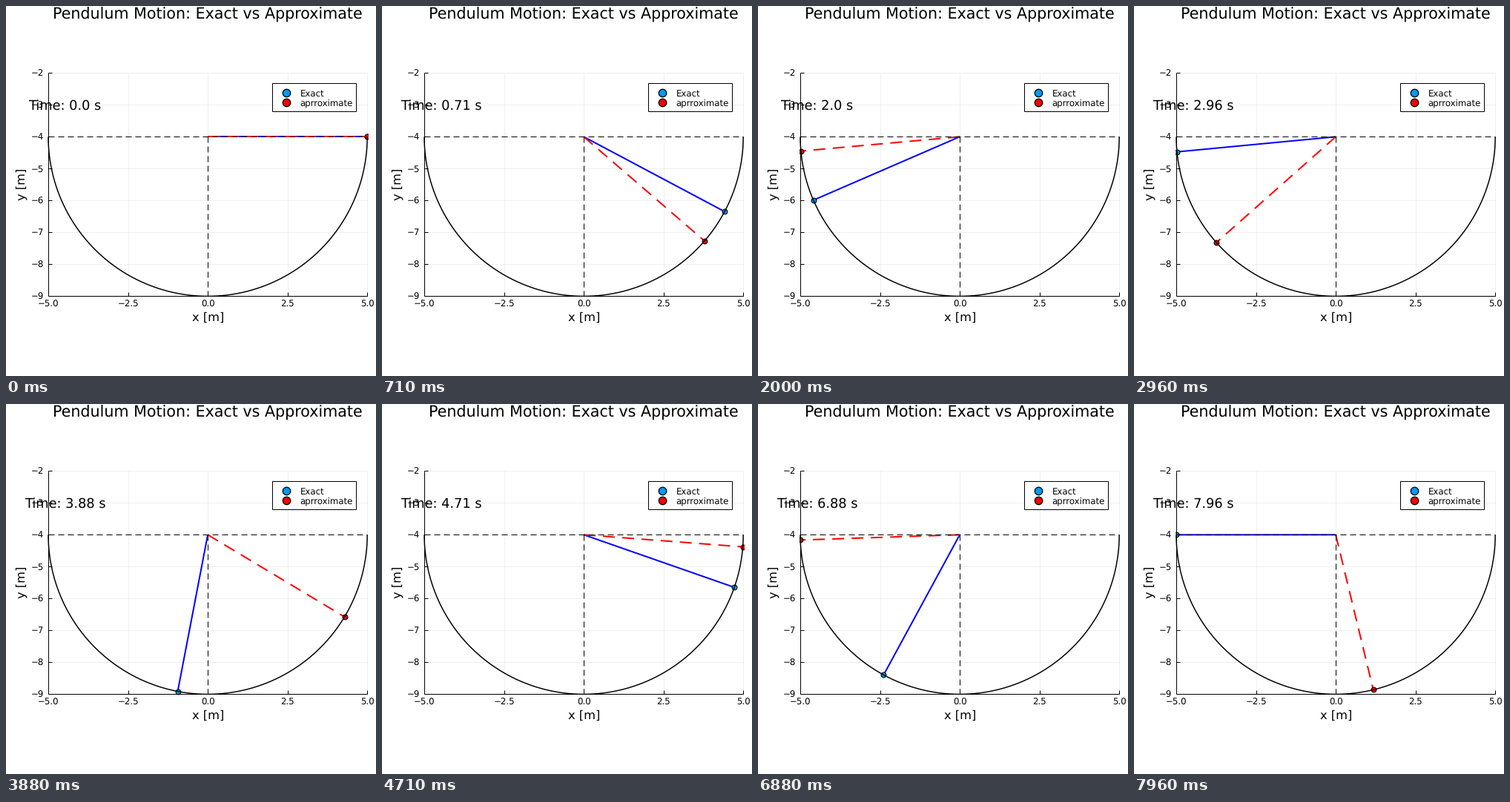
Animation of 499x499 px, one loop 8000 ms. Source, as a matplotlib script:

```python
import math

import matplotlib.pyplot as plt
from matplotlib.animation import FuncAnimation
from matplotlib.patches import Rectangle

SIZE, DPI = 499, 100
LOOP, STEP = 8000, 20          # ms
FPS = 24                       # simulation pictures per second
LENGTH, GRAVITY, PIVOT = 5.0, 9.81, -4.0
OMEGA2 = GRAVITY / LENGTH
START = math.pi / 2

PX = 72 / DPI                  # one pixel in points
FONT = 1.064
DASH = (0, (8, 5))
SKY = "#009AFA"

# plot area in pixels
X0, Y0, SCALE = 272.1, 176.35, 43.02
PAD = 1.0                      # room for strokes on the plot's edge

plt.rcParams["font.family"] = "DejaVu Sans"
plt.rcParams["text.hinting"] = "no_hinting"


def px(x):
    return X0 + SCALE * x


def py(y):
    return Y0 + SCALE * (PIVOT - y)


def swing(count, substeps=20):
    """Angles of the full nonlinear pendulum, by Runge-Kutta."""
    h = 1 / FPS / substeps
    a, v = START, 0.0
    angles = []

    def acc(angle):
        return -OMEGA2 * math.sin(angle)

    for _ in range(count):
        angles.append(a)
        for _ in range(substeps):
            a1, v1 = v, acc(a)
            a2, v2 = v + h / 2 * v1, acc(a + h / 2 * a1)
            a3, v3 = v + h / 2 * v2, acc(a + h / 2 * a2)
            a4, v4 = v + h * v3, acc(a + h * a3)
            a += h / 6 * (a1 + 2 * a2 + 2 * a3 + a4)
            v += h / 6 * (v1 + 2 * v2 + 2 * v3 + v4)
    return angles


def bob(angle):
    return LENGTH * math.sin(angle), PIVOT - LENGTH * math.cos(angle)


fig = plt.figure(figsize=(SIZE / DPI, SIZE / DPI), dpi=DPI, facecolor="white")

left, right, top, bottom = px(-5), px(5), py(-2), py(-9)
ax = fig.add_axes([(left - PAD) / SIZE, 1 - (bottom + PAD) / SIZE,
                   (right - left + 2 * PAD) / SIZE,
                   (bottom - top + 2 * PAD) / SIZE])
margin = PAD / SCALE
ax.set(xlim=(-5 - margin, 5 + margin), ylim=(-9 - margin, -2 + margin))
ax.axis("off")

page = fig.add_axes([0, 0, 1, 1])
page.set(xlim=(0, SIZE), ylim=(SIZE, 0))
page.axis("off")


def stroke(x, y, width=1.0, color="black", **kw):
    return page.plot(x, y, color=color, lw=width * PX,
                     solid_capstyle="butt", **kw)[0]


def label(x, y, text, points, ha="center", **kw):
    return page.text(x, y, text, fontsize=points * FONT, ha=ha,
                     va="baseline", color="black", **kw)


def series(width, color, z, **kw):
    return ax.plot([], [], color=color, lw=width * PX, zorder=z,
                   solid_capstyle="butt", dash_capstyle="butt", **kw)[0]


def ball(axes, x, y, size, edge, color, z):
    return axes.plot(x, y, "o", ms=size * PX, mfc=color, mec="black",
                     mew=edge * PX, zorder=z, snap=False)[0]


def number(value, digits):
    return f"{value:.{digits}f}".replace("-", "\u2212")


# grid, axes and ticks
for x in (-5, -2.5, 0, 2.5, 5):
    stroke([px(x)] * 2, [top, bottom], 0.6, alpha=0.1)
    stroke([px(x)] * 2, [bottom, bottom - 5])
    label(px(x), 406, number(x, 1), 8)
for y in range(-9, -1):
    stroke([left, right], [py(y)] * 2, 0.6, alpha=0.1)
    stroke([left, left + 5], [py(y)] * 2)
    label(51.5, py(y) + 4, number(y, 0), 8, ha="right")
stroke([left, right], [bottom, bottom])
stroke([left, left], [top, bottom])

label(272.3, 18, "Pendulum Motion: Exact vs Approximate", 14)
label(272.6, 425, "x [m]", 11)
label(26, 240.6, "y [m]", 11, rotation=90, rotation_mode="anchor")
clock = label(79.6, 140, "", 12)

# legend
page.add_patch(Rectangle((359.3, 104.3), 113, 38, fc="white", ec="black",
                         lw=PX, zorder=5))
for y, name, color in ((117.3, "Exact", SKY), (130.1, "aprroximate", "red")):
    ball(page, [378.5], [y], 10.4, 1.3, color, 6)
    label(396.4, y + 4.6, name, 8, ha="left", zorder=6)

# rods and bobs
exact_rod = series(2, "blue", 2)
exact_bob = ball(ax, [], [], 6.8, 1.1, SKY, 3)
approx_rod = series(2, "red", 4, linestyle=DASH)
approx_bob = ball(ax, [], [], 6.8, 1.1, "red", 5)

# path and guide lines lie over the bobs
arc = [bob(START * k / 100) for k in range(-100, 101)]
series(1.5, "black", 6).set_data(*zip(*arc))
for xs, ys in (((-5, 5), (-4, -4)), ((0, 0), (-4, -9)), ((-5, 5), (-9, -9))):
    series(1, "black", 6, linestyle=DASH).set_data(xs, ys)

exact_angles = swing(LOOP * FPS // 1000)


def place(rod, mass, angle):
    x, y = bob(angle)
    rod.set_data([0, x], [PIVOT, y])
    mass.set_data([x], [y])


def draw(i):
    k = int((i + 0.5) * STEP * FPS / 1000)
    t = k / FPS
    place(exact_rod, exact_bob, exact_angles[k])
    place(approx_rod, approx_bob, START * math.cos(math.sqrt(OMEGA2) * t))
    clock.set_text(f"Time: {round(t, 2)} s")
    return exact_rod, exact_bob, approx_rod, approx_bob, clock


anim = FuncAnimation(fig, draw, frames=LOOP // STEP, interval=STEP,
                     init_func=lambda: draw(0), repeat=True, repeat_delay=0,
                     cache_frame_data=False)
plt.show()
```
